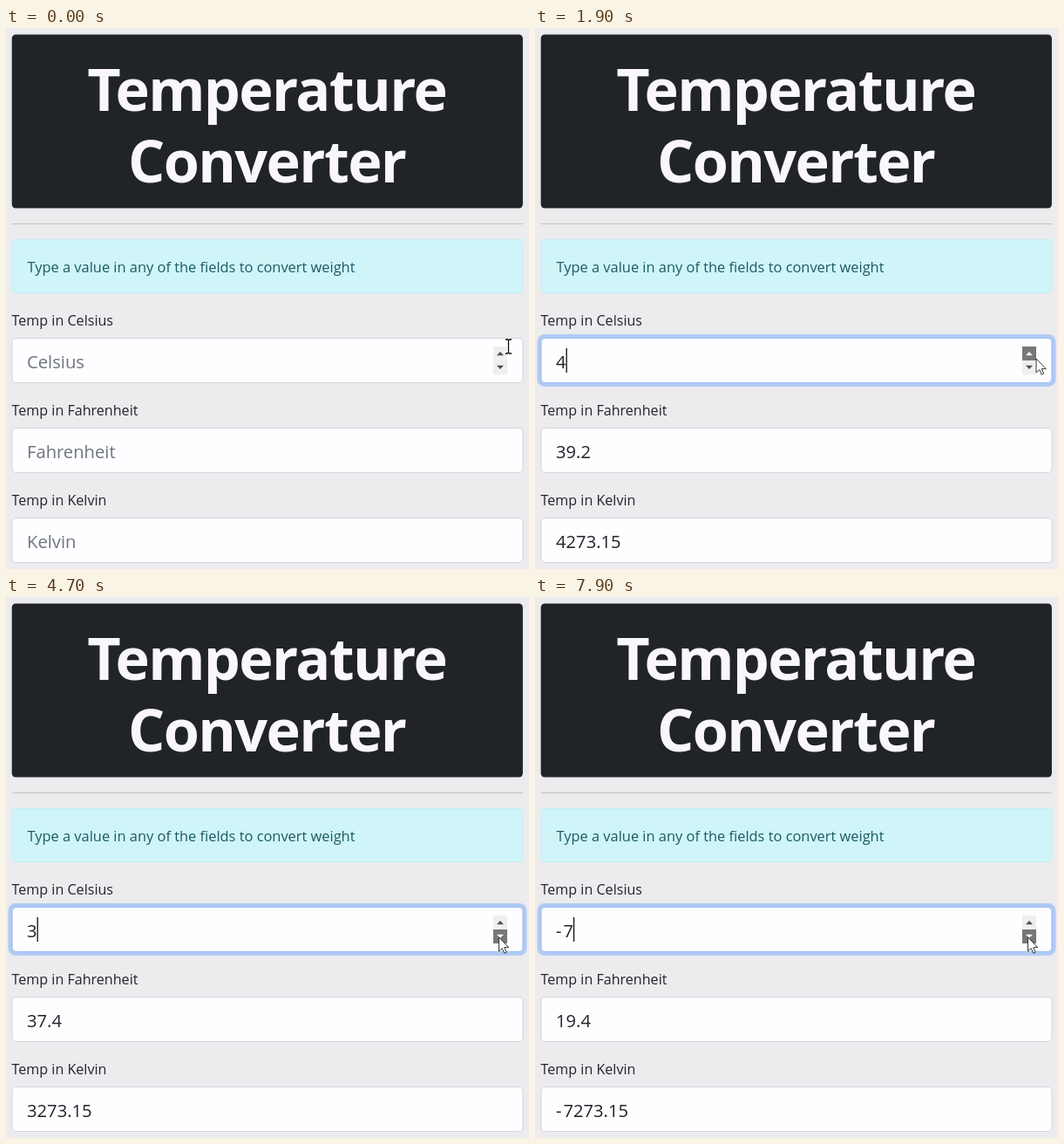
These frames come from a looping animation (600 by 620 pixels, 8 s). An HTML page:

```html
<!DOCTYPE html>
<html lang="en">
<head>
<meta charset="utf-8">
<title>Temperature Converter</title>
<style>
  html, body { margin: 0; width: 100%; height: 100%; overflow: hidden; background: #ecebee; }
  svg { display: block; width: 600px; height: 620px; }
  text { font-family: "Open Sans", "Noto Sans", sans-serif; fill: #212529; white-space: pre; }
  .title { font-size: 66.5px; font-weight: 700; letter-spacing: -1.6px; fill: #f9f6fd; text-anchor: middle; }
  .label { font-size: 16.1px; }
  .note { font-size: 16.4px; fill: #1c5964; }
  .value { font-size: 20.2px; }
  .empty { fill: #6c757d; }
  .minus { letter-spacing: 1.9px; }
  .box { fill: #fefdff; stroke: #d3d5da; }
</style>
</head>
<body>
<svg id="stage" viewBox="0 0 600 620">
  <rect x="6.7" y="7.5" width="586.2" height="199" rx="4.5" fill="#202428"/>
  <text class="title" x="299.2" y="95">Temperature</text>
  <text class="title" x="299.2" y="177">Converter</text>
  <rect x="7" y="224" width="586" height="1" fill="#c3c3c6"/>
  <rect x="7" y="242.5" width="586" height="61" rx="4" fill="#cff5f9" stroke="#c3eff4"/>
  <text class="note" x="24.5" y="279.5">Type a value in any of the fields to convert weight</text>
  <g id="fields"></g>
  <g id="focus">
    <rect x="4.8" y="353.3" width="590.4" height="55.4" rx="6" fill="none" stroke="#b0caf4" stroke-width="4.4"/>
    <rect x="7" y="355.5" width="586" height="51" rx="4.5" fill="none" stroke="#9abdf5"/>
  </g>
  <rect id="caret" y="367" width="1.3" height="28" fill="#111"/>
  <g id="spin">
    <rect x="559" y="365" width="16" height="16"/>
    <path d="M563 375.2L567 371L571 375.2Z"/>
    <rect x="559" y="381" width="16" height="16"/>
    <path d="M563 386.8L567 391L571 386.8Z"/>
  </g>
  <path id="beam" d="M-3.5 -8H-1L0 -7L1 -8H3.5M0 -7V7M-3.5 8H-1L0 7L1 8H3.5" fill="none" stroke="#111" stroke-width="1.3"/>
  <path id="arrow" d="M0 0V16L3.7 12.6L6.3 18.3L8.7 17.2L6.2 11.6H11.2Z" fill="#fff" stroke="#222" stroke-width="0.9"/>
</svg>
<script>
const LOOP = 8000;
const LEFT = 24;
const $ = id => document.getElementById(id);

// [time, Celsius]: evenly repeated steps while a spin button is held
const steps = [];
const hold = (start, from, to) => {
  const dir = Math.sign(to - from);
  for (let i = 0; i <= Math.abs(to - from); i++) steps.push([start + i * 300, from + i * dir]);
};
hold(1000, 1, 7);
hold(3700, 6, 1);
hold(5800, 0, -7);

// [time, up state, down state]
const buttons = [
  [0, 'idle', 'idle'], [500, 'hover', 'idle'], [1000, 'down', 'idle'],
  [3000, 'hover', 'idle'], [3600, 'idle', 'hover'], [3700, 'idle', 'down'],
  [5400, 'idle', 'hover'], [5800, 'idle', 'down']
];
const looks = {
  idle: ['#efeef0', '#4d4d4d'],
  hover: ['#cbcacc', '#4d4d4d'],
  down: ['#777779', '#f4f4f4']
};

// [time, x, y] of the pointer
const path = [
  [0, 576.5, 365], [200, 576.5, 365], [500, 573, 374], [800, 575, 379],
  [3000, 575, 379], [3200, 573, 379], [3500, 573, 379], [3650, 565.5, 390], [LOOP, 565.5, 390]
];

const fields = ['Celsius', 'Fahrenheit', 'Kelvin'].map((name, i) => {
  const g = document.createElementNS('http://www.w3.org/2000/svg', 'g');
  g.setAttribute('transform', `translate(0 ${i * 103})`);
  g.innerHTML = `<text class="label" x="6.5" y="340.5">Temp in ${name}</text>
    <rect class="box" x="7" y="355.5" width="586" height="51" rx="4.5"/>
    <text class="value" x="${LEFT}" y="389.5"></text>`;
  $('fields').append(g);
  return { name, text: g.querySelector('.value') };
});

const latest = (table, t) => table.filter(row => row[0] <= t).pop();

function pointerAt(t) {
  const i = Math.max(1, path.findIndex(p => p[0] > t));
  const [a, b] = [path[i - 1], path[i]];
  const k = (t - a[0]) / (b[0] - a[0]);
  const e = k * k * (3 - 2 * k);
  return [a[1] + (b[1] - a[1]) * e, a[2] + (b[2] - a[2]) * e];
}

function show(field, value) {
  const text = value === null ? field.name : value;
  if (field.shown === text) return;
  field.shown = text;
  field.text.classList.toggle('empty', value === null);
  field.text.innerHTML = text.replace('-', '<tspan class="minus">-</tspan>');
}

function draw(t) {
  const step = latest(steps, t);
  const c = step && step[1];
  const values = step ? [`${c}`, `${+(c * 1.8 + 32).toFixed(1)}`, `${c}273.15`] : [null, null, null];
  fields.forEach((f, i) => show(f, values[i]));

  $('focus').style.opacity = Math.min(1, Math.max(0, (t - 950) / 150));
  const lit = step && (t - step[0]) % 1000 < 500;
  $('caret').style.display = lit ? '' : 'none';
  if (lit) $('caret').setAttribute('x', LEFT + fields[0].text.getComputedTextLength());

  const [, up, down] = latest(buttons, t);
  const parts = $('spin').children;
  [...looks[up], ...looks[down]].forEach((color, i) => parts[i].setAttribute('fill', color));

  const place = `translate(${pointerAt(t).join(' ')})`;
  for (const id of ['beam', 'arrow']) {
    $(id).setAttribute('transform', place);
    $(id).style.display = (id === 'arrow') === (t >= 500) ? '' : 'none';
  }
}

const start = performance.now();
function tick(now) {
  draw(Math.max(0, now - start) % LOOP);
  requestAnimationFrame(tick);
}
draw(0);
requestAnimationFrame(tick);
</script>
</body>
</html>
```
